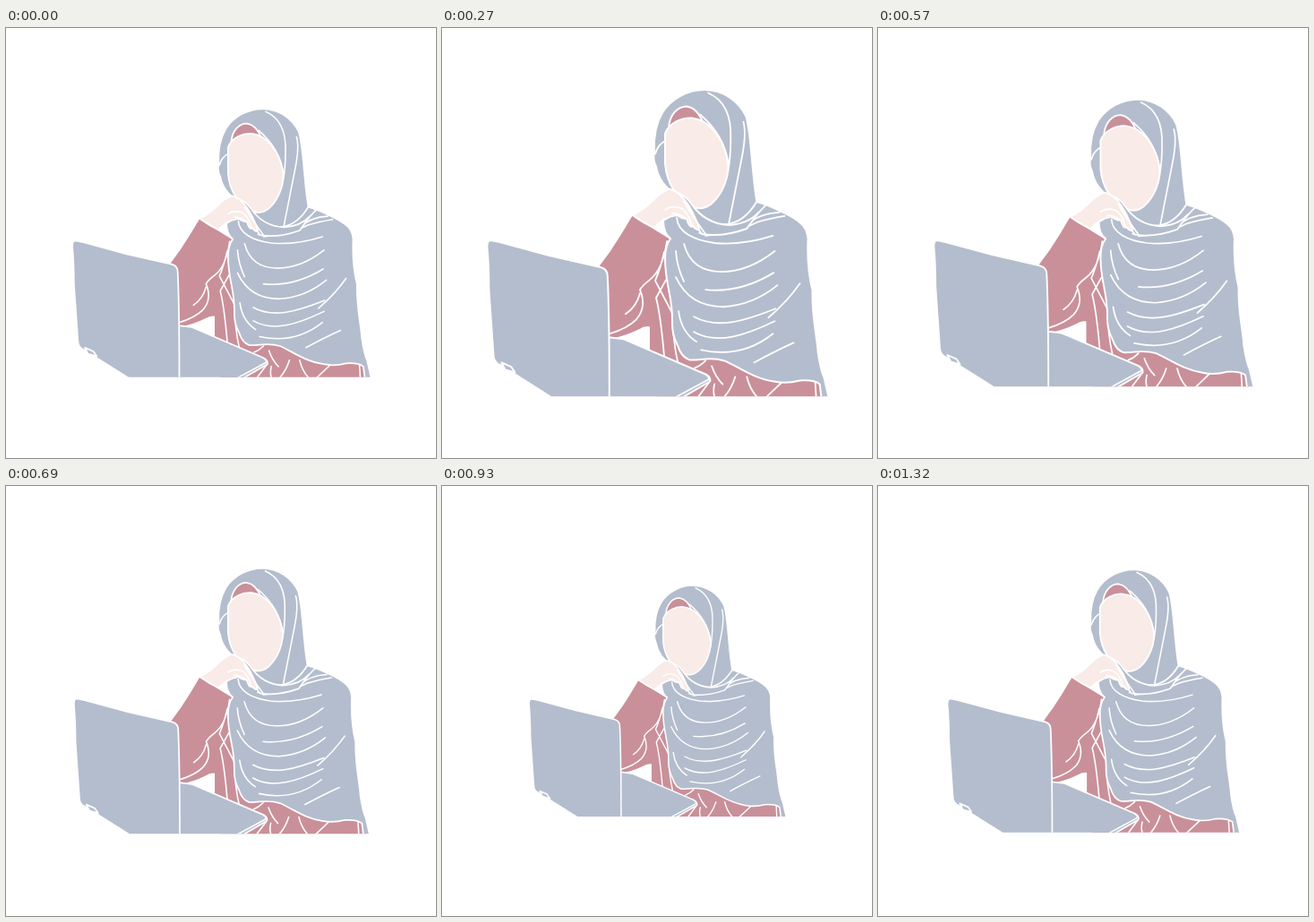
An HTML page for the animation above (1.35 s loop, 480 by 480 pixels).

```html
<!DOCTYPE html>
<html lang="en">
<head>
<meta charset="utf-8">
<title>Woman at a laptop</title>
<style>
  html, body { margin: 0; width: 100%; height: 100%; overflow: hidden; background: #fff; }
  svg { display: block; width: 100vw; height: 100vh; }
  path { stroke: #fff; stroke-width: 2; stroke-linecap: round; stroke-linejoin: round; }
  .blue { fill: #b4bdcd; }
  .pink { fill: #c9909a; }
  .skin { fill: #f9ebe7; }
  .line { fill: none; stroke-width: 1.8; }
  .bare { stroke: none; }
</style>
</head>
<body>
<svg viewBox="0 0 480 480">
  <defs><clipPath id="desk"><path d="M0 0H480V410.6H0Z"/></clipPath></defs>
  <g id="scene"><g clip-path="url(#desk)">
    <!-- dress and sleeve -->
    <path class="pink bare" d="M213 209L255 235L262 300L264 350L300 364L425 390V413H240L232 360V333Q226 332 220 336Q204 344 186 347L175 267Q189 249 201 229Z"/>
    <path class="line" d="M251 238C248 260 241 274 232 281Q224 287 221 292C226 304 225 316 217 325Q207 335 187 341M221 296Q217 311 205 319M248 250Q244 268 238 282L257 318M250 281L239 301Q244 320 248 366M257 320Q258 350 263 372"/>
    <path class="line" d="M301 377Q305 389 313 397M294 371Q288 377 282 379M327 389Q323 402 315 411M340 389Q343 402 351 411M380 394L361 412M298 395L286 411M304 397Q302 405 304 411M416 394L417 411"/>

    <!-- shawl -->
    <path class="pink" d="M347 190L355 197L349 202Z"/>
    <path class="blue" d="M262 206L300 195L350 194Q362 197 376 204Q392 211 400 218Q407 224 408 235C407 258 409 277 413 293C412 322 418 343 419 361Q422 382 426 390L431 412H423L421 397Q415 392 399 393Q384 397 370 394C348 391 331 378 315 371C298 366 288 371 276 370Q267 367 263 354Q257 343 257 330C258 300 249 287 249 258Q249 243 255 235Q247 229 247 215Z"/>
    <path class="line" d="M262 212C263 228 281 237 304 240Q334 243 369 232M287 229Q318 233 340 220Q354 207 376 206M294 232Q330 228 351 217Q364 213 382 210M346 214Q355 204 361 198"/>
    <path class="line" d="M270 241C275 260 287 272 312 272Q342 272 371 249M261 249Q262 266 270 283M294 292Q332 296 370 273M261 278C272 302 292 311 314 311Q347 309 374 287M281 322C307 336 337 327 372 313M281 339C307 354 340 342 371 327M289 359Q334 369 369 341M399 285Q385 305 364 323M392 351Q372 360 348 373M264 316Q267 339 284 350"/>

    <!-- hood -->
    <path class="blue" d="M294 69.5C314 70 331 82 339 99C345 118 345 158 351 194Q338 216 319 219Q296 222 284 206L262 187Q242 174 239 155Q235 147 237 138C236 119 239 107 246 95C256 79 275 69 294 69.5Z"/>
    <path class="line" d="M297 73C315 81 323 98 322 124Q322 145 319 160M336 105Q340 118 334 147L320 218M238 141Q241 130 250 126"/>
    <path class="pink" d="M253 112C254 97 263 88 273 88Q285 90 291 106Z"/>
    <path class="skin" d="M249 118C254 106 268 100 279 101C298 103 313 123 318 145C323 166 311 187 301 196Q291 204 281 200C263 191 251 175 249 152Z"/>
    <path class="line" d="M288 97C303 110 316 128 319 151"/>

    <!-- hand -->
    <path class="blue" d="M260 184Q270 185 278 196C288 211 301 219 320 220Q341 219 353 206L340 224Q312 234 290 230L276 212Z"/>
    <path class="skin" d="M213 209Q228 201 237 191Q245 183 254 180Q263 182 270 191Q280 203 287 224Q284 227 280 221Q276 224 273 213Q268 213 262 209Q247 211 237 223Q225 218 213 209Z"/>
    <path class="line" d="M213 209L255 235M249 203Q258 197 268 202Q275 207 279 221M257 207Q265 207 273 213M270 194Q280 211 294 230"/>

    <!-- laptop -->
    <path class="blue" d="M186 345L203 347L294 386Q300 389 299 394L268 412H186Z"/>
    <path class="line" d="M260 412L297 392Q299 390 295 387"/>
    <path class="blue" d="M55 237L65 239L120 254L177 267Q185 269 185 277Q187 320 187 412H123L66 376Q58 373 58 364L53 292Q53 265 51 244Q51 237 55 237Z"/>
    <path class="blue" d="M67 373L78 378L82 384L71 381Z"/>
  </g></g>
</svg>
<script>
  const scene = document.getElementById('scene');
  const LOOP = 1350, STEP = 30, DRAWN = 1.139;

  function draw(now) {
    const t = Math.floor((now % LOOP) / STEP) * STEP;
    const k = (1 + 0.15 * Math.sin(2 * Math.PI * t / LOOP)) / DRAWN;
    scene.setAttribute('transform', `translate(240 240) scale(${k}) translate(-240 -240)`);
  }

  const start = performance.now();
  function tick() {
    draw(performance.now() - start);
    requestAnimationFrame(tick);
  }
  tick();
</script>
</body>
</html>
```
